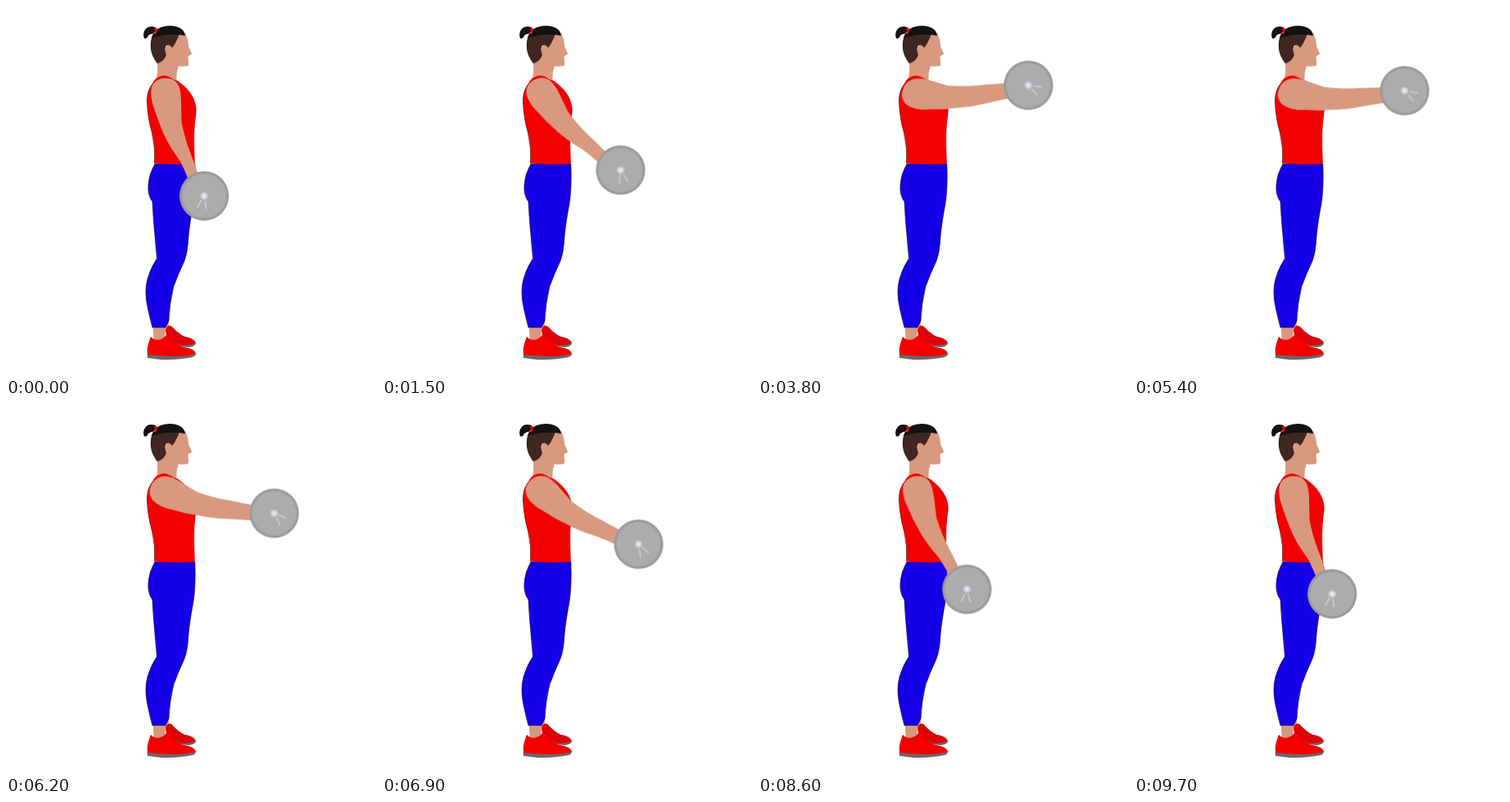
An HTML page without scripts that plays this animation: 450x450 px, repeating every 9800 ms.

```html
<!DOCTYPE html>
<html lang="en">
<head>
<meta charset="utf-8">
<title>Front raise</title>
<style>
  html, body { margin: 0; width: 100%; height: 100%; overflow: hidden; background: #fff; }
  svg { display: block; width: 100vw; height: 100vh; }

  .skin { fill: #d8997f; }
  .red { fill: #f40000; }
  .far { fill: #dc0208; }
  .black { fill: #141112; }
  .brown { fill: #3f2621; }
  .sole { fill: #6c6468; }
  .pants { fill: #1400e6; }
  .edge { stroke: #2b1020; stroke-width: .6; }

  /* The arm swings around the shoulder, one pose every 100 ms. */
  .arm { transform-origin: 195px 105px; animation: raise 9.8s infinite steps(5); }

  /* The elbow and shoulder change a little as the arm comes up. */
  .limb { animation: flex 9.8s infinite ease-in-out; }

  @keyframes raise {
    0%       { transform: rotate(0deg); }
    5.102%   { transform: rotate(-3.3deg); }
    10.204%  { transform: rotate(-11.6deg); }
    15.306%  { transform: rotate(-25.1deg); }
    20.408%  { transform: rotate(-40.6deg); }
    25.51%   { transform: rotate(-53.6deg); }
    30.612%  { transform: rotate(-63.8deg); animation-timing-function: steps(8); }
    38.776%  { transform: rotate(-73.6deg); animation-timing-function: steps(7); }
    45.918%  { transform: rotate(-75.8deg); }
    51.02%   { transform: rotate(-74deg); animation-timing-function: steps(4); }
    55.102%  { transform: rotate(-70.8deg); animation-timing-function: steps(6); }
    61.224%  { transform: rotate(-62.6deg); }
    66.327%  { transform: rotate(-51deg); animation-timing-function: steps(4); }
    70.408%  { transform: rotate(-40.7deg); animation-timing-function: steps(6); }
    76.531%  { transform: rotate(-26.3deg); }
    81.633%  { transform: rotate(-15.1deg); animation-timing-function: steps(6); }
    87.755%  { transform: rotate(-6.1deg); animation-timing-function: steps(4); }
    91.837%  { transform: rotate(-2.4deg); animation-timing-function: steps(7); }
    98.98%, 100% { transform: rotate(0deg); }
  }

  @keyframes flex {
    0%, 100% { d: path("M190 88Q203 86 209 95Q213 102 213 117L213.5 141Q217 160 224 178L236 210 223 214Q218 201 212 189Q198 170 191.5 155Q185 140 180 124Q175 110 177 99Q180 90 190 88Z"); }
    38%, 55% { d: path("M190 86Q203 85 209 95Q213 102 213 117L213 137Q218 160 226 178L238 210 219 213Q212 199 205 187Q196 172 190 155Q183 140 179 124Q173 110 176 97Q180 87 190 86Z"); }
  }
</style>
</head>
<body>
<svg viewBox="0 0 450 450">
  <!-- far foot -->
  <path class="skin" d="M193 380H198L198 392 194 398Z"/>
  <path class="sole" d="M205 411L231 410Q231 414 222 415L208 414Z"/>
  <path class="far" d="M194 394Q197 386 202 390Q209 398 217 402Q229 404 231 410Q222 414 210 412L196 406Z"/>

  <!-- near foot -->
  <path class="skin" d="M178.500 388H194L193 409H180Z"/>
  <path class="sole" d="M172 422L231 422Q232 427 222 428Q200 431 188 430L172 428Z"/>
  <path class="red" d="M176 402Q179 406 185 406Q192 405 195 400Q199 400 202 405Q208 413 217 415Q230 417 231 423Q220 426 205 426Q188 426 172 424Q171 417 173 411Z"/>

  <!-- head and neck -->
  <path class="skin" d="M184 66L196 50 198 33H218Q222 42 222 49L226 58Q225 60 221.500 61L222.300 72Q217 74.500 210 73Q207 80 207.500 90L200 100 182 96Q185 80 184 66Z"/>
  <path class="brown" d="M179 34Q175 41 176 52Q177 61 184 70Q193 67 195 59Q192 52 195 48Q199 46 202 51Q206 46 208 41L211 34Z"/>
  <path class="skin" d="M195 59Q192 50 196 48Q201 47 201 53Q200 59 195 60Z"/>
  <path class="black" d="M177 39Q180 29 188 26Q200 22 210 26Q217 29 218 36Q206 34 196 35Q186 36 177 39ZM182 26Q173 23 169 29Q166 34 168 39Q171 41 173 36Q175 34 182 33Z"/>
  <path class="red" d="M180 27Q183 26 184 28L183 34 180 34Q182 31 180 27Z"/>

  <!-- body -->
  <path class="pants edge" d="M181 192H229.800Q231 220 228 240Q223.500 264 222 280Q221 300 217 310Q210 325 204 341Q199 361 198 383L194 391 178 391Q175 380 172 366Q168 347 172 332Q176 318 183.500 307Q181.500 285 179.500 262L178 238Q172 230 173 217Q174 204 181 192Z"/>
  <path class="red" d="M177 96Q182 85 192 84.500Q199 85 203 89L209 91Q223 101 228.500 113Q232 122 231.500 129Q228.500 148 229 170L229.800 192Q204 193.500 180.500 191.500Q182 173 177.500 154Q172.500 138 171.500 117Q171 105 177 96Z"/>
  <path fill="none" class="edge" d="M177 96Q171 105 171.500 117Q172.500 138 177.500 154Q182 173 180.500 191.500"/>

  <!-- arm with barbell plate -->
  <g class="arm">
    <path class="skin limb" d="M190 88Q203 86 209 95Q213 102 213 117L213.500 141Q217 160 224 178L236 210 223 214Q218 201 212 189Q198 170 191.500 155Q185 140 180 124Q175 110 177 99Q180 90 190 88Z"/>
    <g transform="translate(241 231)">
      <circle r="30" fill="#999"/>
      <circle r="27" fill="#acacac" stroke="#a4a4a4"/>
      <path d="M-3 5L-8.500 14M1 6L2.500 16" stroke="#cacace" stroke-width="1.800"/>
      <circle r="4.500" fill="#cfd1d8" stroke="#bcbdc2"/>
      <circle r="2.300" fill="#e6e7f2"/>
    </g>
  </g>
</svg>
</body>
</html>
```
